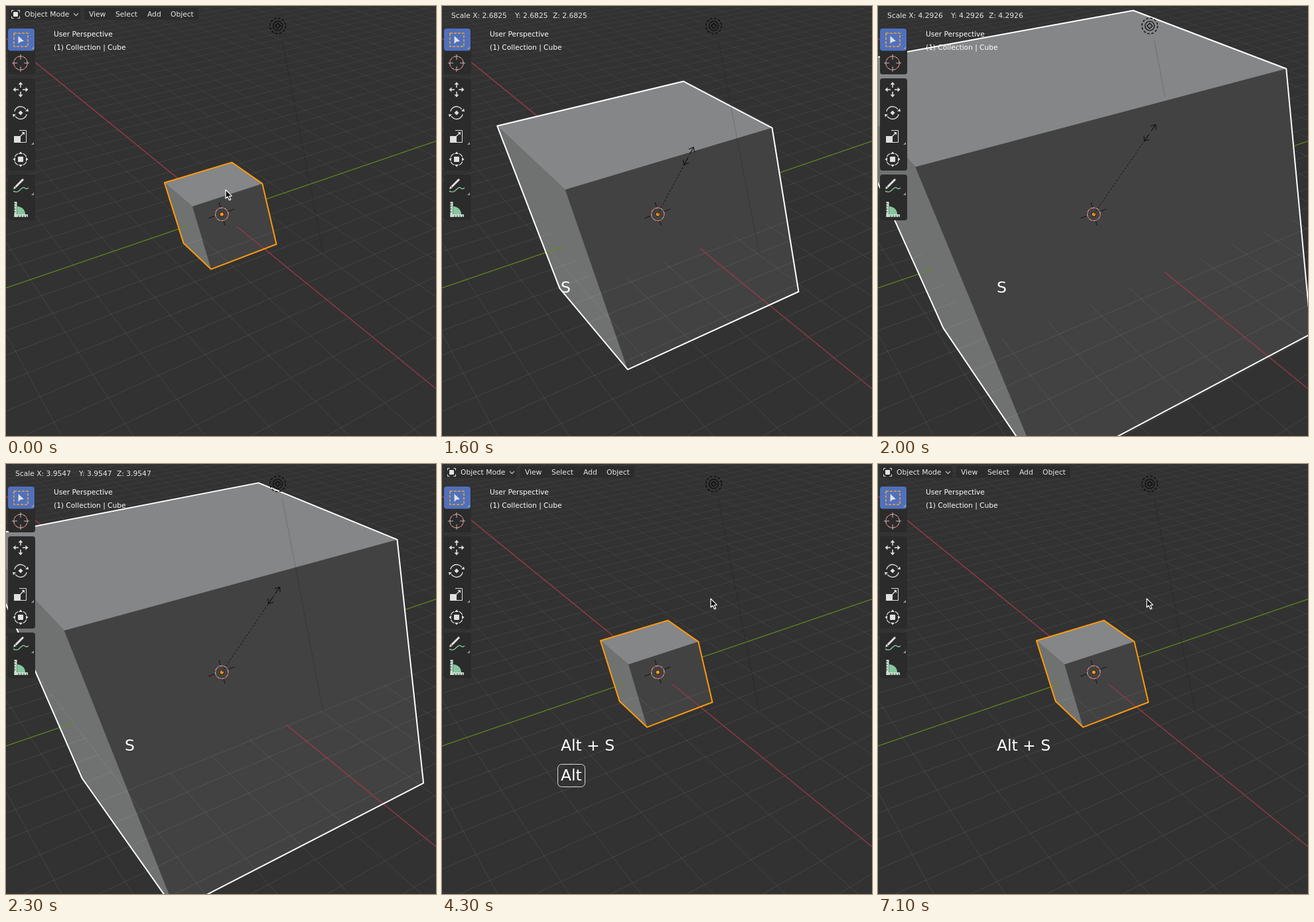
Animation of 648 by 648 pixels, one loop 7.2 s. Source, as an HTML page with a canvas:

```html
<!DOCTYPE html>
<html lang="en">
<head>
<meta charset="utf-8">
<title>Scaling a cube</title>
<style>
html, body { margin: 0; height: 100%; overflow: hidden; background: #323232; }
canvas { display: block; }
</style>
</head>
<body>
<canvas width="648" height="648"></canvas>
<script>
const ctx = document.querySelector('canvas').getContext('2d');
const LOOP = 7200, STEP = 100;
const ORIGIN = [325.2, 313.8];
const FONT = '"DejaVu Sans", sans-serif';

// Time, cube scale, mouse x, mouse y
const KEYS = [
  [1400, 1, 331, 277], [1500, 1.75, 350, 251], [1600, 2.6825, 372, 226],
  [1800, 3.8104, 400, 202], [2000, 4.2926, 410, 191],
  [2200, 4.0254, 405, 197], [2300, 3.9547, 404, 198]
];

function pose(t) {
  if (t <= KEYS[0][0]) return KEYS[0].slice(1);
  const i = KEYS.findIndex(k => k[0] >= t);
  if (i < 0) return KEYS[KEYS.length - 1].slice(1);
  const a = KEYS[i - 1], b = KEYS[i], f = (t - a[0]) / (b[0] - a[0]);
  return [1, 2, 3].map(n => a[n] + (b[n] - a[n]) * f);
}

// Perspective view of a world point
function project(x, y, z = 0) {
  const w = 1 - .02875 * x + .02675 * y - .0265 * z;
  return [
    ORIGIN[0] + (21.85 * x + 49.95 * y - 12.5 * z) / w,
    ORIGIN[1] + (17.8 * x - 17.05 * y - 45.6 * z) / w
  ];
}

function trace(points, closed) {
  ctx.beginPath();
  points.forEach(p => ctx.lineTo(p[0], p[1]));
  if (closed) ctx.closePath();
}
function line(points, color, width = 1, closed = false) {
  trace(points, closed);
  ctx.strokeStyle = color;
  ctx.lineWidth = width;
  ctx.stroke();
}
function fill(points, color) {
  trace(points, true);
  ctx.fillStyle = color;
  ctx.fill();
}
function arc(x, y, r, color, width = 1, from = 0, to = 2 * Math.PI) {
  ctx.beginPath();
  ctx.arc(x, y, r, from, to);
  ctx.strokeStyle = color;
  ctx.lineWidth = width;
  ctx.stroke();
}
function dot(x, y, r, color) {
  ctx.beginPath();
  ctx.arc(x, y, r, 0, 2 * Math.PI);
  ctx.fillStyle = color;
  ctx.fill();
}
function box(x, y, w, h, r, color) {
  ctx.beginPath();
  ctx.roundRect(x, y, w, h, r);
  ctx.fillStyle = color;
  ctx.fill();
}
function text(s, x, y, size = 10.7, color = '#e8e8e8') {
  ctx.font = `${size}px ${FONT}`;
  ctx.fillStyle = color;
  ctx.fillText(s, x, y);
}
function dashed(pattern, draw) {
  ctx.setLineDash(pattern);
  draw();
  ctx.setLineDash([]);
}
function at(x, y, angle, draw) {
  ctx.save();
  ctx.translate(x, y);
  ctx.rotate(angle);
  draw();
  ctx.restore();
}

const X0 = -40, X1 = 13, Y0 = -10, Y1 = 24;
const fade = ctx.createLinearGradient(0, 0, 0, 420);
fade.addColorStop(0, 'rgba(255,255,255,.04)');
fade.addColorStop(1, 'rgba(255,255,255,.085)');

// Ground lines; with a scale given, only the parts in front of the cube
function ground(s) {
  const alongX = y => [project(s && y >= -s ? s : X0, y), project(X1, y)];
  const alongY = x => [project(x, Y0), project(x, s && x <= s ? -s : Y1)];
  for (let x = X0; x <= X1; x++) if (x) line(alongY(x), fade);
  for (let y = Y0; y <= Y1; y++) if (y) line(alongX(y), fade);
  line(alongX(0), '#a03a47', 1.2);
  line(alongY(0), '#658a20', 1.2);
}

function cube(s, outline) {
  const v = (x, y, z) => project(x * s, y * s, z * s);
  const A = v(-1, -1, 1), B = v(-1, 1, 1), C = v(1, 1, 1), D = v(1, -1, 1);
  const E = v(-1, -1, -1), F = v(1, -1, -1), G = v(1, 1, -1);
  const silhouette = [A, B, C, G, F, E];
  fill(silhouette, '#424242');
  fill([A, D, F, E], '#6f7270');
  fill([A, B, C, D], '#858688');
  ctx.save();
  trace(silhouette, true);
  ctx.clip();
  ground(s);
  ctx.restore();
  ctx.lineJoin = 'round';
  line(silhouette, outline, 2, true);
}

function lamp(s) {
  const x = 4.076, y = 1.005;
  const top = project(x, y, 5.6), foot = project(x, y, s > x ? s : 0);
  line([top, foot], 'rgba(0,0,0,.17)');
  line([[409.5, 26], [413.5, 30], [409.5, 34], [405.5, 30]], '#0a0a0a', 1.2, true);
  arc(409.5, 30, 7, '#0a0a0a', 1.2);
  dashed([3.6, 2.6], () => arc(409.5, 30, 11.8, '#0a0a0a', 1.4));
}

function ring(x, y, r) {
  const n = Math.PI * r / 8;
  arc(x, y, r, '#d8d0d0', 1);
  dashed([n, n], () => arc(x, y, r, '#c8403c', 1.1));
}

function cursor3d() {
  const [x, y] = ORIGIN;
  [[-4, -18, -2, -10], [9, -4, 19, -8], [-20, 6, -9, 2], [2, 8, 5, 17]]
    .forEach(([a, b, c, d]) => line([[x + a, y + b], [x + c, y + d]], '#111'));
  ring(x, y, 9.8);
  dot(x, y, 3.4, '#2a1a08');
  dot(x, y, 2.6, '#ff9d1c');
}

function pointer(x, y) {
  const shape = [[0, 0], [0, 13], [3, 10.3], [5.4, 15.6], [7.7, 14.6], [5.4, 9.5], [9.3, 9.3]]
    .map(p => [x + p[0], y + p[1]]);
  fill(shape, '#0c0c0c');
  line(shape, '#fff', 1.2, true);
}

function scaleHandle(x, y) {
  const dx = x - ORIGIN[0], dy = y - ORIGIN[1];
  dashed([3, 2.5], () => line([ORIGIN, [x, y]], '#111'));
  at(x, y, Math.atan2(dy, dx), () => {
    for (const d of [-1, 1]) {
      line([[3 * d, 0], [15 * d, 0]], '#111', 1.1);
      line([[9 * d, -5], [15 * d, 0], [9 * d, 5]], '#111', 1.1);
    }
  });
}

function header(scaling, s) {
  if (scaling) {
    const n = s.toFixed(4);
    text('Scale X: ' + n, 14, 17.5);
    text('Y: ' + n, 110, 17.5);
    text('Z: ' + n, 167, 17.5);
    return;
  }
  box(4, 3, 108, 18, 3, '#2c2c2c');
  box(118, 3, 172, 18, 3, '#2c2c2c');
  const w = '#e6e6e6';
  box(11, 9, 7, 7, 1, w);
  for (const [i, j] of [[-1, -1], [1, -1], [1, 1], [-1, 1]]) {
    const x = 14.5 + 6 * i, y = 12.5 + 6 * j;
    line([[x - 3 * i, y], [x, y], [x, y - 3 * j]], w);
  }
  text('Object Mode', 28, 16.2);
  line([[102, 11], [105.5, 14.5], [109, 11]], '#bbb', 1.2);
  [['View', 125], ['Select', 165], ['Add', 213], ['Object', 248]]
    .forEach(([s, x]) => text(s, x, 16.2));
}

function toolbar() {
  const w = '#e0e0e0', bg = '#2b2b2b', green = '#84c79e';
  box(3, 34, 41, 69, 4, bg);
  box(3, 109, 41, 139, 4, bg);
  box(3, 254, 41, 69, 4, bg);
  box(3, 34, 40, 33.5, 4, '#5070bd');
  for (const y of [65, 209, 285]) fill([[42, y - 4], [42, y], [38, y]], '#999');

  // Select
  dashed([4, 2], () => line([[12, 41], [33, 41], [33, 61], [12, 61]], '#f0a52c', 1.5, true));
  fill([[18.5, 45], [18.5, 57], [21.5, 54], [27, 53]], w);
  // Cursor
  ring(22, 86, 10.3);
  for (let i = 0; i < 4; i++) at(22, 86, i * Math.PI / 2, () => line([[5, 0], [13, 0]], '#bbb'));
  // Move
  for (let i = 0; i < 4; i++) at(22, 126, i * Math.PI / 2, () => {
    line([[3, 0], [8, 0]], w, 1.5);
    fill([[7.5, -3.5], [11.5, 0], [7.5, 3.5]], w);
  });
  // Rotate
  for (let i = 0; i < 2; i++) at(22, 161, i * Math.PI, () => {
    arc(0, 0, 9.5, w, 1.3, -2.9, -.6);
    fill([[7, -2.5], [12, -2], [11, -6.5]], w);
  });
  fill([[22, 157.5], [25.5, 161], [22, 164.5], [18.5, 161]], w);
  // Scale
  line([[20, 187.5], [30.5, 187.5], [30.5, 205.5], [13, 205.5], [13, 196]], w);
  box(12, 196, 10, 10, 0, w);
  line([[21, 197], [27, 191]], w, 1.3);
  fill([[23.5, 190], [28, 190], [28, 194.5]], w);
  // Transform
  box(18, 227, 8, 8, 1, w);
  for (let i = 0; i < 4; i++) at(22, 231, i * Math.PI / 2, () => {
    arc(0, 0, 9.5, w, 1.2, .4, 1.17);
    fill([[8, -3], [11.5, 0], [8, 3]], w);
  });
  // Annotate
  line([[14.5, 272.5], [26, 261]], w, 3);
  fill([[11, 276], [12.5, 271.5], [15.5, 274.5]], w);
  ctx.beginPath();
  ctx.moveTo(11, 279);
  ctx.bezierCurveTo(21, 284, 23, 270, 28, 274);
  ctx.quadraticCurveTo(31, 277, 34, 274);
  ctx.strokeStyle = green;
  ctx.lineWidth = 1.4;
  ctx.stroke();
  // Measure
  ctx.beginPath();
  ctx.moveTo(17, 302);
  ctx.arc(17, 314, 12, -Math.PI / 2, 0);
  ctx.lineTo(17, 314);
  ctx.fillStyle = green;
  ctx.fill();
  box(12.5, 295, 4, 23, 0, '#c9dfd0');
  box(12.5, 314, 20.5, 4, 0, '#c9dfd0');
  for (let i = 0; i < 4; i++) {
    line([[12, 298 + i * 4], [14.5, 298 + i * 4]], bg);
    line([[19 + i * 4, 318], [19 + i * 4, 315.5]], bg);
  }
}

function pressedKeys(t) {
  const size = 23.4, color = '#fff';
  if (t >= 4300) text('Alt + S', 179, 432, size, color);
  else if (t >= 1000 && t < 4000) text('S', 179, 432, size, color);
  if (t >= 3800 && t < 4600) {
    ctx.beginPath();
    ctx.roundRect(174.5, 452.5, 41, 34, 6);
    ctx.strokeStyle = '#ddd';
    ctx.lineWidth = 1;
    ctx.stroke();
    text('Alt', 179, 476.5, size, color);
  }
}

function draw(time) {
  const t = Math.floor(time % LOOP / STEP) * STEP;
  const [size, mx, my] = pose(t);
  const scaling = t >= 1000 && t < 2600;
  const s = t < 4300 ? size : 1;

  ctx.fillStyle = '#323232';
  ctx.fillRect(0, 0, 648, 648);
  ground();
  cube(s, scaling ? '#fff' : '#ff9a0c');
  lamp(s);
  cursor3d();
  header(scaling, s);
  toolbar();
  text('User Perspective', 72, 45.5, 10.6, '#fff');
  text('(1) Collection | Cube', 72, 65.5, 10.6, '#fff');
  pressedKeys(t);
  if (scaling) scaleHandle(mx, my);
  else if (t < 1000) pointer(331, 277);
  else pointer(405, 203);
}

const start = performance.now();
function tick() {
  draw(performance.now() - start);
  requestAnimationFrame(tick);
}
tick();
</script>
</body>
</html>
```
